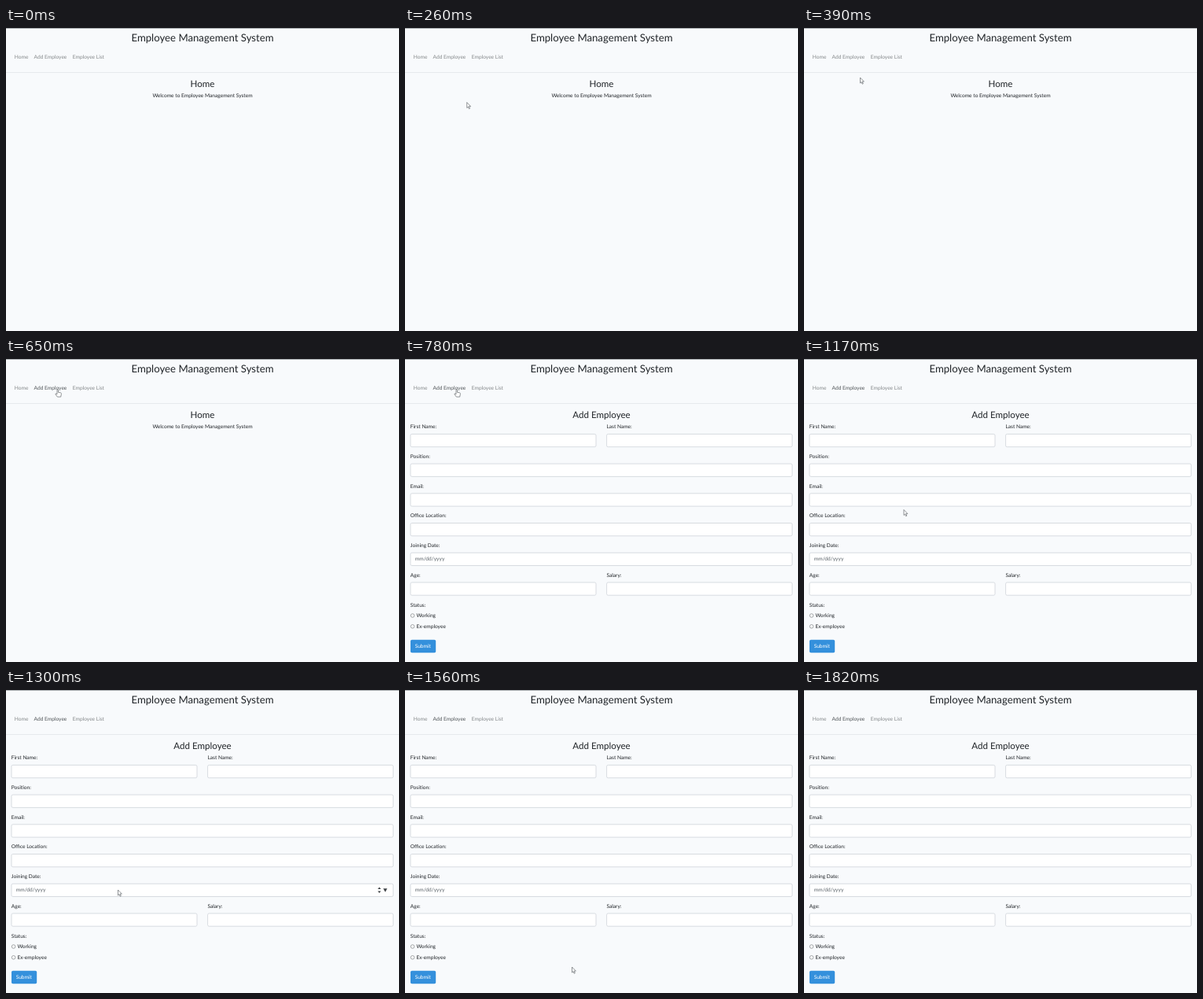
Animation, 500 px wide and 385 px high, one loop 2210 ms. Source, as an HTML page:

```html
<!DOCTYPE html>
<html lang="en">
<head>
<meta charset="utf-8">
<title>Employee Management System</title>
<style>
  html, body { margin: 0; width: 100%; height: 100%; overflow: hidden; background: #f8fafc; }
  svg { display: block; width: 100%; height: 100%; }
  text { font-family: Lato, "Open Sans", sans-serif; font-size: 6.6px; fill: #212529; text-rendering: geometricPrecision; }
  .title { font-size: 13.2px; text-anchor: middle; }
  .heading { font-size: 11.6px; text-anchor: middle; }
  .center { text-anchor: middle; }
  .nav { fill: #85898b; }
  .nav.on { fill: #505558; }
  .field { fill: #fff; stroke: #ced4da; stroke-width: .8; }
  .radio { fill: #fff; stroke: #8d9194; stroke-width: .8; }
</style>
</head>
<body>
<svg viewBox="0 0 500 385">
  <rect width="500" height="385" fill="#f8fafc"/>
  <rect width="500" height="1" fill="#a9adb0"/>
  <rect y="56" width="500" height="1" fill="#e6eaed"/>
  <text class="title" x="250" y="17.4">Employee Management System</text>
  <text class="nav" x="10.8" y="38.9">Home</text>
  <text class="nav" id="addLink" x="35.6" y="38.9">Add Employee</text>
  <text class="nav" x="84.8" y="38.9">Employee List</text>

  <g id="home">
    <text class="heading" x="250" y="74.6">Home</text>
    <text class="center" x="250" y="88.2">Welcome to Employee Management System</text>
  </g>

  <g id="form">
    <text class="heading" x="250" y="74.6">Add Employee</text>
    <g id="fields"></g>
    <text x="12.8" y="256.3" style="fill:#5a6268">mm/dd/yyyy</text>
    <g id="picker" fill="#3d4145">
      <path d="M473 253 l2 -2.6 2 2.6z M473 255.4 l2 2.6 2 -2.6z M480 252.3 h5 l-2.5 4.4z"/>
    </g>
    <text x="6.8" y="314.7">Status:</text>
    <circle class="radio" cx="9.6" cy="326" r="2.3"/>
    <text x="14.4" y="328.4">Working</text>
    <circle class="radio" cx="9.6" cy="339.8" r="2.3"/>
    <text x="14.4" y="342.3">Ex-employee</text>
    <rect x="7" y="356.7" width="32.2" height="16.5" rx="1.8" fill="#3490dc"/>
    <text x="12.7" y="367.2" style="fill:#fff">Submit</text>
  </g>

  <g id="cursor" fill="#fff" stroke="#62666a" stroke-width=".7" stroke-linejoin="round">
    <path id="arrow" d="M0 0 V7 L1.6 5.6 L2.7 8.2 L3.8 7.7 L2.7 5.1 H4.9 Z"/>
    <path id="hand" d="M0 .6 Q.8 -.6 1.5 .6 V3.8 L4.6 4.4 Q5.6 4.7 5.4 6 L4.7 9.6 H.4 L-2 6.3 Q-2 5 -.9 5.5 L0 6.3 Z"/>
  </g>
</svg>
<script>
const $ = id => document.getElementById(id);
const LOOP = 2210, STEP = 130;

// Label, row, column (-1 spans the full width)
const fields = [
  ["First Name:", 0, 0], ["Last Name:", 0, 1], ["Position:", 1, -1],
  ["Email:", 2, -1], ["Office Location:", 3, -1], ["Joining Date:", 4, -1],
  ["Age:", 5, 0], ["Salary:", 5, 1]
];
$("fields").innerHTML = fields.map(([label, row, col]) => {
  const x = col > 0 ? 256.6 : 7, y = 88.2 + row * 37.7;
  return `<text x="${x - .2}" y="${y}">${label}</text>` +
    `<rect class="field" x="${x}" y="${y + 7.2}" width="${col < 0 ? 485.6 : 236}" height="16.3" rx="1.8"/>`;
}).join("");

// Cursor path: step, x, y
const path = [
  [1, 86, 126], [3, 71.5, 63], [4, 67, 46], [5, 65, 38.5], [6, 65, 38.5],
  [8, 111.5, 129], [10, 142.5, 254], [12, 212.5, 352], [13, 240, 380]
];

function cursorAt(step) {
  const i = Math.max(1, path.findIndex(p => p[0] >= step));
  const [s, x, y] = path[i - 1], [s2, x2, y2] = path[i];
  const k = (step - s) / (s2 - s);
  return [x + (x2 - x) * k, y + (y2 - y) * k];
}

const show = (id, on) => $(id).setAttribute("visibility", on ? "visible" : "hidden");

function draw(time) {
  const step = Math.floor(time % LOOP / STEP);
  const hasCursor = step >= 1 && step <= 13;
  const onLink = step === 5 || step === 6;
  show("home", step < 6);
  show("form", step >= 6);
  show("picker", step === 10);
  show("arrow", hasCursor && !onLink);
  show("hand", onLink);
  $("addLink").classList.toggle("on", step >= 5);
  if (hasCursor) $("cursor").setAttribute("transform", `translate(${cursorAt(step)})`);
}

const start = performance.now();
function tick() {
  draw(performance.now() - start);
  requestAnimationFrame(tick);
}
tick();
</script>
</body>
</html>
```
